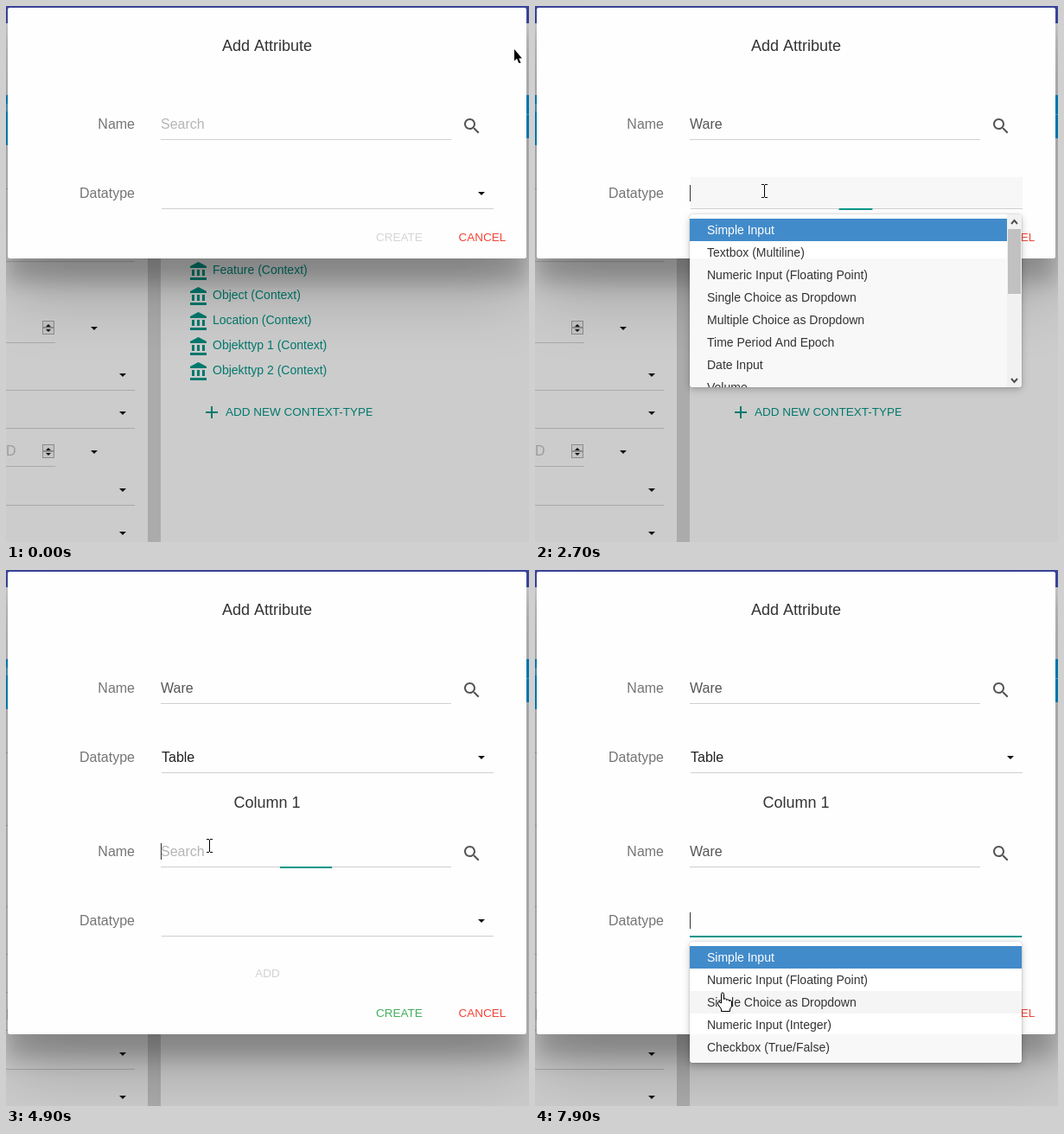
Animation, 605 px wide and 620 px high, one loop 8000 ms. Source, as an HTML page with a canvas:

```html
<!DOCTYPE html>
<html lang="en">
<head>
<meta charset="utf-8">
<title>Add Attribute</title>
<style>
  html, body { margin: 0; width: 100%; height: 100%; overflow: hidden; }
  canvas { display: block; }
</style>
</head>
<body>
<canvas id="stage" width="605" height="620"></canvas>
<script>
const ctx = document.getElementById('stage').getContext('2d');
const LOOP = 8000, STEP = 100;
const TEAL = '#009688', DIM_TEAL = '#00796d', LINE = '#cfcfcf';
const BUTTON_SIZE = 13.5;

const icons = {
  search: 'M15.5 14h-.79l-.28-.27C15.41 12.59 16 11.11 16 9.5 16 5.91 13.09 3 9.5 3S3 5.91 3 9.5 5.91 16 9.5 16c1.61 0 3.09-.59 4.23-1.57l.27.28v.79l5 4.99L20.49 19l-4.99-5zm-6 0C7.01 14 5 11.99 5 9.5S7.01 5 9.5 5 14 7.01 14 9.5 11.99 14 9.5 14z',
  refresh: 'M17.65 6.35C16.2 4.9 14.21 4 12 4c-4.42 0-7.99 3.58-7.99 8s3.57 8 7.99 8c3.73 0 6.84-2.55 7.73-6h-2.08c-.82 2.33-3.04 4-5.65 4-3.31 0-6-2.69-6-6s2.69-6 6-6c1.66 0 3.14.69 4.22 1.78L13 11h7V4l-2.35 2.35z',
  bank: 'M4 10v7h3v-7H4zm6 0v7h3v-7h-3zM2 22h19v-3H2v3zm14-12v7h3v-7h-3zm-4.5-9L2 6v2h19V6l-9.5-5z',
  plus: 'M19 13h-6v6h-2v-6H5v-2h6V5h2v6h6v2z',
  arrow: 'M0 0V13.5L3 10.8L5.2 16H7.5L5.3 10.4H8.8Z',
  hand: 'M-1.5 12V1.5Q-1.5 0 0 0Q1.5 0 1.5 1.5V7.5Q3 5.8 4.5 7.5V8.5Q6 6.8 7.5 8.5V9.5Q10.5 8 10.5 11V16L8.5 19V21.5H-1.5V19L-5.5 13Q-6 10.5 -4 10.5Z'
};
for (const name in icons) icons[name] = new Path2D(icons[name]);

const simpleTypes = ['Simple Input', 'Numeric Input (Floating Point)', 'Single Choice as Dropdown',
  'Numeric Input (Integer)', 'Checkbox (True/False)'];
const allTypes = ['Simple Input', 'Textbox (Multiline)', 'Numeric Input (Floating Point)',
  'Single Choice as Dropdown', 'Multiple Choice as Dropdown', 'Time Period And Epoch', 'Date Input',
  'Volume', 'Area', 'Numeric Input (Integer)', 'Percentage', 'Checkbox (True/False)', 'Geometry',
  'Context', 'Color', 'List', 'Table'];

// time, x, y, pointer shape from that moment on
const pointerPath = [
  [50, 588, 50, 'arrow'], [500, 340, 137, 'beam'], [1600, 340, 137, 'beam'], [1750, 270, 152, 'arrow'],
  [2000, 220, 166, 'hand'], [2200, 220, 166, 'hand'], [2400, 265, 214, 'beam'], [2700, 265, 214, 'beam'],
  [2850, 258, 260, 'hand'], [3200, 247, 418, 'hand'], [3700, 247, 418, 'hand'], [4100, 247, 400, 'hand'],
  [4200, 236, 326, 'beam'], [4400, 235, 319, 'beam'], [5800, 235, 319, 'beam'], [6000, 221, 350, 'hand'],
  [6400, 220, 355, 'hand'], [6700, 216, 404, 'beam'], [6950, 216, 404, 'hand'], [7500, 215, 462, 'hand'],
  [7900, 217, 489, 'hand']
];

const during = (t, from, to) => t >= from && t < to;
const smooth = u => { u = Math.max(0, Math.min(1, u)); return u * u * (3 - 2 * u); };
const focusAmount = (t, from, to) => during(t, from, to) ? smooth((t - from) / 300) : 0;
const blink = (t, since) => Math.floor((t - since) / 500) % 2 === 0;

function pointerAt(t) {
  const next = pointerPath.findIndex(key => key[0] > t);
  if (next <= 0) {
    const [, x, y, shape] = pointerPath.at(next);
    return { x, y, shape };
  }
  const [t0, x0, y0, shape] = pointerPath[next - 1], [t1, x1, y1] = pointerPath[next];
  const u = smooth((t - t0) / (t1 - t0));
  return { x: Math.round(x0 + (x1 - x0) * u), y: Math.round(y0 + (y1 - y0) * u), shape };
}

function rect(x, y, w, h, color) {
  ctx.fillStyle = color;
  ctx.fillRect(x, y, w, h);
}

// y is the middle of the capitals
function text(str, x, y, size, color, { align = 'left', bold = false } = {}) {
  ctx.font = `${bold ? 'bold ' : ''}${size}px "Liberation Sans", Arial, sans-serif`;
  ctx.textAlign = align;
  ctx.fillStyle = color;
  ctx.fillText(str, x, y + Math.round(size * 0.35));
}

function icon(name, x, y, color, outline) {
  ctx.save();
  ctx.translate(x, y);
  ctx.fillStyle = color;
  ctx.fill(icons[name]);
  if (outline) {
    ctx.strokeStyle = outline;
    ctx.stroke(icons[name]);
  }
  ctx.restore();
}

function triangle(x, y, color = '#111', half = 4, height = 4) {
  ctx.fillStyle = color;
  ctx.beginPath();
  ctx.moveTo(x - half, y);
  ctx.lineTo(x + half, y);
  ctx.lineTo(x, y + height);
  ctx.fill();
}

function shadowBox(x, y, w, h, radius, fill, shadows) {
  ctx.save();
  for (const [offset, blur, color] of shadows) {
    ctx.shadowOffsetY = offset;
    ctx.shadowBlur = blur;
    ctx.shadowColor = color;
    ctx.fillStyle = fill;
    ctx.beginPath();
    ctx.roundRect(x, y, w, h, radius);
    ctx.fill();
  }
  ctx.restore();
}

function drawPage() {
  rect(0, 0, 605, 620, '#cccccc');
  rect(0, 0, 605, 20, '#3a459b');
  rect(0, 103, 3, 58, '#0290d0');
  rect(0, 113, 3, 9, '#58a8cc');
  rect(602, 103, 3, 50, '#0290d0');
  rect(602, 125, 3, 1, '#6cb4d2');
  rect(164, 160, 15, 460, '#ababab');
  for (const [y, w] of [[211, 149], [295, 149], [389, 57], [444, 149], [488, 149], [532, 57], [577, 149]])
    rect(0, y, w, 1, '#a9a9a9');
  for (const [x, y] of [[102, 371], [135, 425], [135, 469], [102, 514], [135, 558], [135, 608]])
    triangle(x, y);
  for (const y of [364, 507]) {
    for (const top of [y, y + 8]) {
      rect(42, top, 14, 8, '#8c8c8c');
      rect(43, top + 1, 12, 6, '#c4c4c4');
    }
    triangle(49, y + 7, '#111', 3, -3);
    triangle(49, y + 10, '#111', 3, 3);
  }
  text('D', 0, 514, 16, '#9c9c9c');
  ['Feature', 'Object', 'Location', 'Objekttyp 1', 'Objekttyp 2'].forEach((name, i) => {
    icon('bank', 211, 295 + 29 * i, DIM_TEAL);
    text(`${name} (Context)`, 239, 305 + 29 * i, 14, DIM_TEAL);
  });
  icon('plus', 226, 458, DIM_TEAL);
  ctx.save();
  ctx.beginPath();
  ctx.rect(250, 455, 173.5, 30);
  ctx.clip();
  text('ADD NEW CONTEXT-TYPE', 254, 469, BUTTON_SIZE, DIM_TEAL);
  ctx.restore();
}

function focusLine(x, y, w, amount) {
  if (amount) rect(x + w * (1 - amount) / 2, y, w * amount, 2, TEAL);
}

function nameField(y, value, focus, caret) {
  text('Name', 149, y, 16, '#757575', { align: 'right' });
  text(value || 'Search', 179, y, 16, value ? '#555' : '#b5b5b5');
  rect(179, y + 18, 336, 1, LINE);
  focusLine(179, y + 18, 336, focus);
  if (caret) rect(179 + (value ? Math.ceil(ctx.measureText(value).width) : 0), y - 9, 1, 19, '#333');
  icon('search', 527, y - 9, '#555');
}

function typeField(y, value, { background, focus = 0, caret = false, open = false, glow = 0 }) {
  text('Datatype', 149, y, 16, '#757575', { align: 'right' });
  if (glow) {
    ctx.globalAlpha = glow;
    shadowBox(178, y - 18, 386, 44, 2, '#ebebeb', [[0, 8, 'rgba(102,175,233,.75)']]);
    ctx.globalAlpha = 1;
  }
  if (background) rect(180, y - 18, 384, 36, background);
  rect(180, y + 18, 384, 1, LINE);
  focusLine(179, y + 18, 384, focus);
  if (value) text(value, 180, y, 16, '#222');
  if (caret) rect(179, y - 9, 1, 19, '#333');
  if (!open) triangle(550, y - 1);
}

function menu(x, y, w, h) {
  shadowBox(x, y, w, h, 4, '#fff', [[0, 2, 'rgba(0,0,0,.25)'], [3, 8, 'rgba(0,0,0,.22)']]);
}

function typeMenu(y, items, height, pointer, dialogBottom, scroll = 0) {
  const content = items.length * 26 + 10, scrolls = content > height;
  const width = scrolls ? 367 : 384;
  menu(179, y, 384, height);
  ctx.save();
  ctx.beginPath();
  ctx.roundRect(179, y, 384, height, 4);
  ctx.clip();
  // the slightly translucent panel looks greyer past the dialog's edge
  rect(179, dialogBottom, 384, height, '#f8f8f8');
  const offset = Math.round(scroll * (content - height));
  items.forEach((item, i) => {
    const top = y + 5 + 26 * i - offset;
    const hovered = pointer.shape === 'hand' && during(pointer.y, top, top + 26);
    if (i === 0) rect(179, top, width, 26, '#428bca');
    else if (hovered) rect(179, top, width, 26, '#f5f5f5');
    text(item, 199, top + 13, 14, i ? '#333' : '#fff');
  });
  if (scrolls) {
    const track = height - 34, thumb = Math.ceil(track * height / content) + 1;
    rect(546, y, 17, height, '#f1f1f1');
    rect(547, Math.round(y + 17 + scroll * (track - thumb)), 15, thumb, '#c1c1c1');
    ctx.strokeStyle = '#505050';
    ctx.lineWidth = 2;
    for (const [cy, d] of [[y + 9, -2], [y + height - 8, 2]]) {
      ctx.beginPath();
      ctx.moveTo(551, cy - d);
      ctx.lineTo(554.5, cy + d);
      ctx.lineTo(558, cy - d);
      ctx.stroke();
    }
  }
  ctx.restore();
}

function suggestions(y) {
  menu(179, y, 160, 114);
  rect(179, y + 5, 160, 26, '#337ab7');
  ['', '1', '2', '3'].forEach((suffix, i) => {
    const color = i ? '#333' : '#fff', middle = y + 18 + 26 * i;
    text('Ware', 199, middle, 14, color, { bold: true });
    text(suffix, 238, middle, 14, color);
  });
}

function drawPointer({ x, y, shape }) {
  if (shape === 'arrow') icon('arrow', x, y, '#000');
  else if (shape === 'hand') icon('hand', x, y, '#fff', '#000');
  else {
    rect(x, y - 7, 1, 14, '#000');
    for (const end of [y - 8, y + 7]) {
      rect(x - 3, end, 3, 1, '#000');
      rect(x + 1, end, 3, 1, '#000');
    }
  }
}

// Typing, lookup, suggestion pick and refocus of a name input
function nameState(t, { focus, letters, lookup, blur }) {
  const typed = letters.filter(time => t >= time).length;
  const pick = lookup + 600;
  const focused = during(t, focus, lookup + 500) || during(t, pick, blur);
  const lastInput = [focus, ...letters, pick].filter(time => time <= t).pop();
  return {
    value: 'Ware'.slice(0, typed),
    amount: focusAmount(t, focus, lookup + 500) || focusAmount(t, pick, blur),
    caret: focused && blink(t, lastInput),
    busy: during(t, lookup, lookup + 300),
    list: during(t, lookup + 300, pick)
  };
}

function draw(t) {
  const pointer = pointerAt(t);
  const table = t >= 3400;
  const first = nameState(t, { focus: 719, letters: [1000, 1100, 1200, 1300], lookup: 1600, blur: 2641 });
  const second = nameState(t, { focus: 4819, letters: [5100, 5200, 5300, 5500], lookup: 5800, blur: 6819 });
  const shift1 = first.busy ? 29 : 0, shift2 = second.busy ? 29 : 0;
  const bottom = (table ? 537 : 292) + shift1 + shift2;
  const open1 = during(t, 2700, 3400), open2 = t >= 6900;
  const hover = (y, open, openedAt) => open ? (t < openedAt + 100 ? '#f7f7f7' : null)
    : during(pointer.x, 180, 564) && during(pointer.y, y - 18, y + 18) ? '#ebebeb' : null;

  drawPage();
  shadowBox(2, 2, 600, bottom - 2, 3, '#fefefe',
    [[40, 77, 'rgba(0,0,0,.22)'], [27, 24, 'rgba(0,0,0,.2)']]);
  text('Add Attribute', 302, 46, 18, '#333', { align: 'center' });

  nameField(136, first.value, first.amount, first.caret);
  if (first.busy) icon('refresh', 359, 163, '#333');
  const y1 = 216 + shift1;
  typeField(y1, table ? 'Table' : '', {
    background: hover(y1, open1, 2700),
    focus: focusAmount(t, 2641, 3400),
    caret: open1 && blink(t, 2641),
    open: open1,
    glow: table ? Math.max(0, Math.min(1, (4500 - t) / 300)) : 0
  });

  if (table) {
    text('Column 1', 302, 269, 18, '#333', { align: 'center' });
    nameField(325, second.value, second.amount, second.caret);
    if (second.busy) icon('refresh', 359, 352, '#333');
    const y2 = 405 + shift2;
    typeField(y2, '', {
      background: hover(y2, open2, 6900),
      focus: focusAmount(t, 6819, LOOP),
      caret: open2 && blink(t, 6819),
      open: open2
    });
    text('ADD', 302.5, 466 + shift2, BUTTON_SIZE, '#d2d2d2', { align: 'center' });
  }
  const createColor = t >= 4200 ? '#43b05c' : t >= 4100 ? '#bbb' : '#d5d5d5';
  text('CREATE', 428, bottom - 25, BUTTON_SIZE, createColor);
  text('CANCEL', 523.5, bottom - 25, BUTTON_SIZE, '#f44336');

  if (first.list) suggestions(158);
  if (second.list) suggestions(347);
  if (open1) typeMenu(241, allTypes, 200, pointer, bottom, smooth((t - 2800) / 400));
  if (open2) typeMenu(430, simpleTypes, 140, pointer, bottom);
  drawPointer(pointer);
}

function tick(now) {
  draw(Math.floor(now % LOOP / STEP) * STEP);
  requestAnimationFrame(tick);
}
requestAnimationFrame(tick);
</script>
</body>
</html>
```
